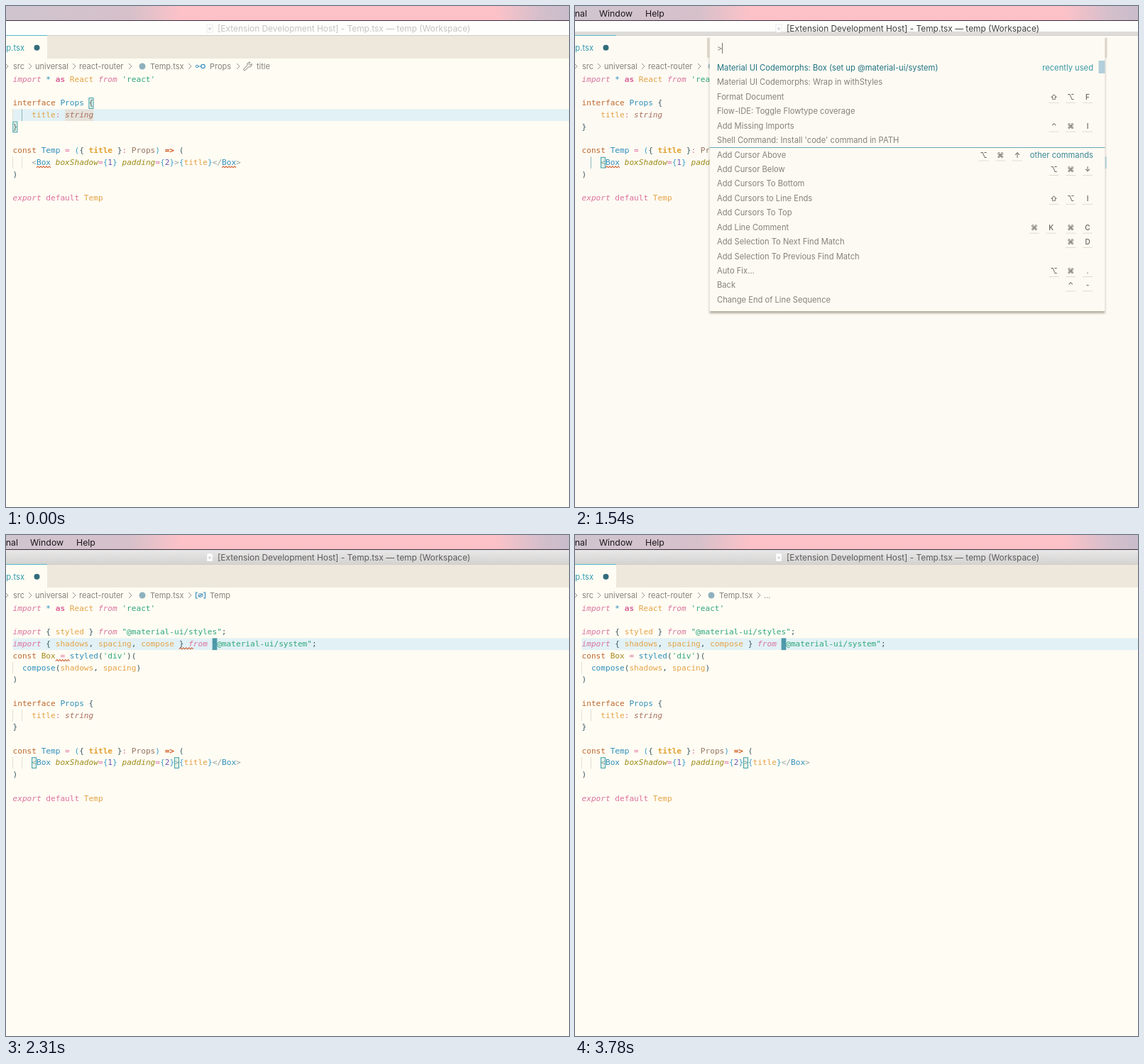
Recreate the animation shown at these times as an HTML page. Size 793 by 706 pixels, loop 3.85 s.

```html
<!DOCTYPE html>
<html lang="en">
<head>
<meta charset="utf-8">
<title>Editor command demo</title>
<style>
html, body { margin: 0; width: 100%; height: 100%; overflow: hidden; background: #fffcf3; }
svg { display: block; }
text { white-space: pre; font: 11.2px Inter, sans-serif; fill: #85827a; }
.code { font: 11.12px "DejaVu Sans Mono", monospace; fill: #3c5a64; }
.i { fill: #d9749f; font-style: italic; }
.p { fill: #de6f9e; }
.P { fill: #d9639a; font-weight: bold; }
.r { fill: #bd672c; }
.R { fill: #cf5a20; font-weight: bold; }
.b { fill: #2f8fbd; }
.o { fill: #e3a347; }
.O { fill: #e0a030; font-weight: bold; }
.g { fill: #2ea77c; }
.y { fill: #9c8b18; font-style: italic; }
.Y { fill: #a88a1c; }
.s { fill: #a8705c; font-style: italic; }
.n { fill: #977563; }
.v { fill: #6a55b0; }
.c { fill: #3a9fca; }
.h { fill: #93a1a1; }
.menu { font-size: 12.3px; fill: #1d181c; }
.title { font-size: 11.88px; fill: #5c5b5b; }
.crumb { font-size: 11px; }
.key { font: 500 10px Inter, "DejaVu Sans", sans-serif; fill: #64615b; }
.line { fill: none; }
</style>
</head>
<body>
<svg id="stage" width="793" height="706" viewBox="0 0 793 706"></svg>
<script>
const LOOP = 3850, OPEN = 1120, FILTER = 1750, CLOSE = 2240, INSERT = 2310;
const CHAR = 6.694, ROW = 16.73, LEFT = 9.5, TOP = 95.2;
const stage = document.getElementById('stage');

// Segments are split by "|"; the first character of each is its colour class.
const head = ["iimport |b* |Pas |oReact |ifrom |g'react'", ''];
const added = [
  'iimport |t{ |ostyled |t} |ifrom |g"@material-ui/styles"|t;',
  'iimport |t{ |oshadows|t, |ospacing|t, |ocompose |t} |ifrom |g"@material-ui/system"|t;',
  "rconst |YBox |p= |bstyled|t(|g'div'|t)(",
  't  |bcompose|t(|oshadows|t, |ospacing|t)',
  't)', ''
];
const body = [
  'rinterface |bProps |t{',
  't    |otitle|p: |sstring',
  't}', '',
  'rconst |bTemp |p= |c(|t{ |Otitle |t}|p: |nProps|c) |R=> |t(',
  't    |h<|bBox |yboxShadow|p=|c{|v1|c} |ypadding|p=|c{|v2|c}|h>|c{|otitle|c}|h</|bBox|h>',
  't)', '',
  'iexport |pdefault |oTemp'
];
// Name, shortcut keys, right edge of the keys.
const commands = [
  ['Material UI Codemorphs: Box (set up @material-ui/system)'],
  ['Material UI Codemorphs: Wrap in withStyles'],
  ['Format Document', '⇧⌥F'],
  ['Flow-IDE: Toggle Flowtype coverage'],
  ['Add Missing Imports', '⌃⌘I'],
  ["Shell Command: Install 'code' command in PATH"],
  ['Add Cursor Above', '⌥⌘↑', 623],
  ['Add Cursor Below', '⌥⌘↓'],
  ['Add Cursors To Bottom'],
  ['Add Cursors to Line Ends', '⇧⌥I'],
  ['Add Cursors To Top'],
  ['Add Line Comment', '⌘K ⌘C'],
  ['Add Selection To Next Find Match', '⌘D'],
  ['Add Selection To Previous Find Match'],
  ['Auto Fix...', '⌥⌘.'],
  ['Back', '⌃-'],
  ['Change End of Line Sequence']
];

const esc = s => s.replace(/&/g, '&amp;').replace(/</g, '&lt;').replace(/>/g, '&gt;');
const rect = (x, y, w, h, fill, more = '') =>
  `<rect x="${x}" y="${y}" width="${w}" height="${h}" fill="${fill}" ${more}/>`;
const path = (d, stroke, width = 1) =>
  `<path class="line" d="${d}" stroke="${stroke}" stroke-width="${width}"/>`;
const circle = (x, y, r, fill, more = '') => `<circle cx="${x}" cy="${y}" r="${r}" fill="${fill}" ${more}/>`;
const text = (x, y, s, cls = '', more = '') =>
  `<text x="${x}" y="${y + 4}" class="${cls}" ${more}>${esc(s)}</text>`;
const END = 'text-anchor="end"', MID = 'text-anchor="middle"';
const colX = col => LEFT + col * CHAR;
const rowY = row => TOP + row * ROW;
const cells = (row, col, n, fill, more) => rect(colX(col), rowY(row), n * CHAR, ROW, fill, more);

function codeLine(line, row) {
  const spans = line.split('|').map(s => `<tspan class="${s[0]}">${esc(s.slice(1))}</tspan>`).join('');
  return line && `<text class="code" x="${LEFT}" y="${rowY(row) + 11.8}">${spans}</text>`;
}

function squiggle(row, col, n) {
  let d = `M${colX(col)} ${rowY(row) + 15.5}`;
  for (let x = 0; x < n * CHAR - 2; x += 4) d += 'l2 -2l2 2';
  return path(d, '#d0693f', 1.1);
}

const bracket = (row, col) => rect(colX(col) + .3, rowY(row) + 1, CHAR - .6, ROW - 2,
  'rgba(60,170,150,.13)', 'stroke="#3b9fa8"');

const guide = (row, col, active) =>
  path(`M${Math.floor(colX(col)) + .5} ${rowY(row)}v${ROW}`, active ? '#8fb9bd' : '#e3dfd2');

function windowFrame(t, washed) {
  const asleep = t < 70;
  let out = `<defs>
    <linearGradient id="sky"><stop offset="0" stop-color="#cfc5cf"/><stop offset=".22" stop-color="#d6c0ca"/>
      <stop offset=".31" stop-color="#fcc2c8"/><stop offset=".87" stop-color="#fcc2c8"/>
      <stop offset=".95" stop-color="#d4bfcb"/><stop offset="1" stop-color="#c9bccb"/></linearGradient>
    <linearGradient id="bar" x2="0" y2="1"><stop stop-color="#e9e8e8"/><stop offset="1" stop-color="#d4d3d2"/></linearGradient>
  </defs>`;
  out += rect(0, 0, 793, 706, washed ? '#fdfaf3' : '#fffcf3') + rect(0, 0, 793, 20, 'url(#sky)');
  out += rect(0, 20, 793, 1, '#3c2b3b');
  if (!asleep)
    out += text(17, 10.5, 'Terminal', 'menu', END) + text(34, 10.5, 'Window', 'menu') + text(99, 10.5, 'Help', 'menu');
  out += rect(0, 21, 793, 20, asleep || washed ? '#fefefd' : 'url(#bar)');
  if (washed) out += rect(0, 36, 793, 5, '#dedcda');
  out += rect(0, 41, 793, 1, '#d2cec8');
  out += rect(283, 26, 8, 11, '#fff', 'stroke="#ddd" stroke-width=".6"') + circle(287, 32, 2, '#d8dcdd');
  out += text(298, 32, '[Extension Development Host] - Temp.tsx — temp (Workspace)', 'title',
    asleep ? 'style="fill:#c5c3c0"' : washed ? 'style="fill:#403f3f"' : '');
  if (!washed) out += rect(58, 42, 735, 32, '#eee8dc');
  out += rect(0, 41, 58, 1, '#55b9c8');
  out += text(26, 59, 'Temp.tsx', '', END + ' style="fill:#2f9bb0"') + circle(43.5, 58.7, 4, '#326c7b');
  return out;
}

function breadcrumbs(t) {
  const blue = '#3b8fc0';
  const chevron = x => path(`M${x - 2} 81l4 4l-4 4`, '#99958c');
  let out = [1, 34, 96, 175, 259].map(chevron).join('');
  out += [[10, 'src'], [41, 'universal'], [103, 'react-router'], [203, 'Temp.tsx']]
    .map(([x, s]) => text(x, 85, s, 'crumb')).join('');
  out += circle(192, 85, 4.5, '#8fb0bd');
  if (t < 630) {
    out += circle(269, 85, 1.7, 'none', `stroke="${blue}"`) + path('M271 85h4', blue) +
      circle(277.5, 85, 2.7, 'none', `stroke="${blue}" stroke-width="1.2"`);
    out += text(287, 85, 'Props', 'crumb') + chevron(327);
    out += path('M335 88.5l5 -5c-1 -3 2 -5 4 -4l-2 2l2 2l2 -2c1 3 -2 5 -4 4l-5 5c-1.5 1 -3 -.5 -2 -2z', '#77756f');
    out += text(353, 85, 'title', 'crumb');
  } else if (t < 2870) {
    out += path('M270 81h-2.5v8h2.5M278 81h2.5v8h-2.5M271 87l6 -4', blue, 1.2) +
      `<ellipse cx="274" cy="85" rx="3.2" ry="2.3" fill="none" stroke="${blue}"/>`;
    out += text(287, 85, 'Temp', 'crumb');
  } else out += text(266, 85, '...', 'crumb');
  return out;
}

// Cursor position as [row, column].
function cursorAt(t) {
  if (t >= INSERT) return [3, 42];
  const row = Math.min(7, 3 + Math.max(0, Math.floor((t - 70) / 70)));
  return [row, row === 4 || row === 5 ? 0 : 12];
}

function editor(t, washed) {
  const inserted = t >= INSERT, shift = inserted ? added.length : 0;
  const [row, col] = cursorAt(t);
  const lines = inserted ? [...head, ...added, ...body] : [...head, ...body];
  const box = 7 + shift;
  let out = washed ? rect(746, rowY(row), 3, ROW, '#c6e0e6') : rect(LEFT, rowY(row), 793, ROW, '#e2f1f5');

  if (t < 70) out += cells(3, 11, 6, 'rgba(235,190,160,.3)');
  if (t >= 490 && !inserted && !washed) out += cells(7, 9, 9, 'rgba(205,195,130,.35)');
  for (const r of [3 + shift, box])
    for (const c of [0, 2]) {
      const active = c === 2 && r === row && !inserted;
      if (active || !washed) out += guide(r, c, active);
    }
  if (inserted) out += guide(5, 0);

  out += lines.map(codeLine).join('');
  if (!inserted) out += squiggle(7, 5, 3) + squiggle(7, 44, 3);
  else if (t < 2660) out += squiggle(3, 35, 3) + squiggle(4, 9, 3);

  out += t < 490 ? bracket(2, 16) + bracket(4, 0) : bracket(box, 4) + bracket(box, 34);
  const lit = inserted ? Math.floor((t - INSERT) / 500) % 2 === 0 : t >= 70 && t < 850;
  if (lit) out += cells(row, col, 1, '#3d8fa0', 'opacity=".88"');
  return out;
}

function shortcut(keys, y, right = 722) {
  let x = right;
  return [...keys].reverse().map(k => {
    if (k === ' ') return x -= 4, '';
    const out = text(x, y, k, 'key', MID) + rect(x - 7, y + 8, 14, .8, '#d9d4c9');
    x -= 23.7;
    return out;
  }).join('');
}

function palette(t, full) {
  const typed = t < 1680 ? '' : t < FILTER ? 'b' : t < 1890 ? 'bo' : 'box';
  const used = color => text(730, 87, 'recently used', '', `${END} style="fill:${color}"`);
  let out = rect(189.5, 42, 557, full ? 388 : 60, full ? '#fdfaf3' : '#faf3e7',
    `style="filter:drop-shadow(0 ${full ? 3 : 2}px ${full ? 1.5 : 4}px rgba(70,60,40,.4))"`);
  if (!full) {
    out += rect(196, 48, 544, 22, '#fffbf3') + rect(189.5, 77, 557, 20, '#cbe8f2');
    out += `<text x="200" y="91" style="fill:#47717c">Material UI Codemorphs: <tspan font-weight="700" fill="#21a3c2">Box</tspan> (set up @material-ui/system)</text>`;
    out += used('#3fafc5');
  } else {
    out += rect(186, 45, 4, 28, '#ddd6c8') + rect(746.5, 45, 3, 28, '#ddd6c8');
    out += rect(737.5, 77, 9, 18, '#b3cfdb') + rect(189.5, 199, 557, 1, '#62a9b6');
    out += commands.map(([name, keys, right], i) => {
      const y = 87 + i * 20.43;
      return text(200, y, name, '', i ? '' : 'style="fill:#1f7282"') + (keys ? shortcut(keys, y, right) : '');
    }).join('');
    out += used('#3a97a6') + text(730, 210.3, 'other commands', '', END + ' style="fill:#3a8795"');
  }
  out += text(200, 60, '>' + typed);
  return out + rect(207 + typed.length * 6.7, 52, 1, 15, '#77736b');
}

function scene(t) {
  const washed = t >= OPEN && t < FILTER;
  const open = t >= OPEN && t < CLOSE;
  return windowFrame(t, washed) + breadcrumbs(t) + editor(t, washed) + (open ? palette(t, washed) : '');
}

let shown = '';
function tick() {
  const next = scene(performance.now() % LOOP);
  if (next !== shown) stage.innerHTML = shown = next;
  requestAnimationFrame(tick);
}
tick();
</script>
</body>
</html>
```
